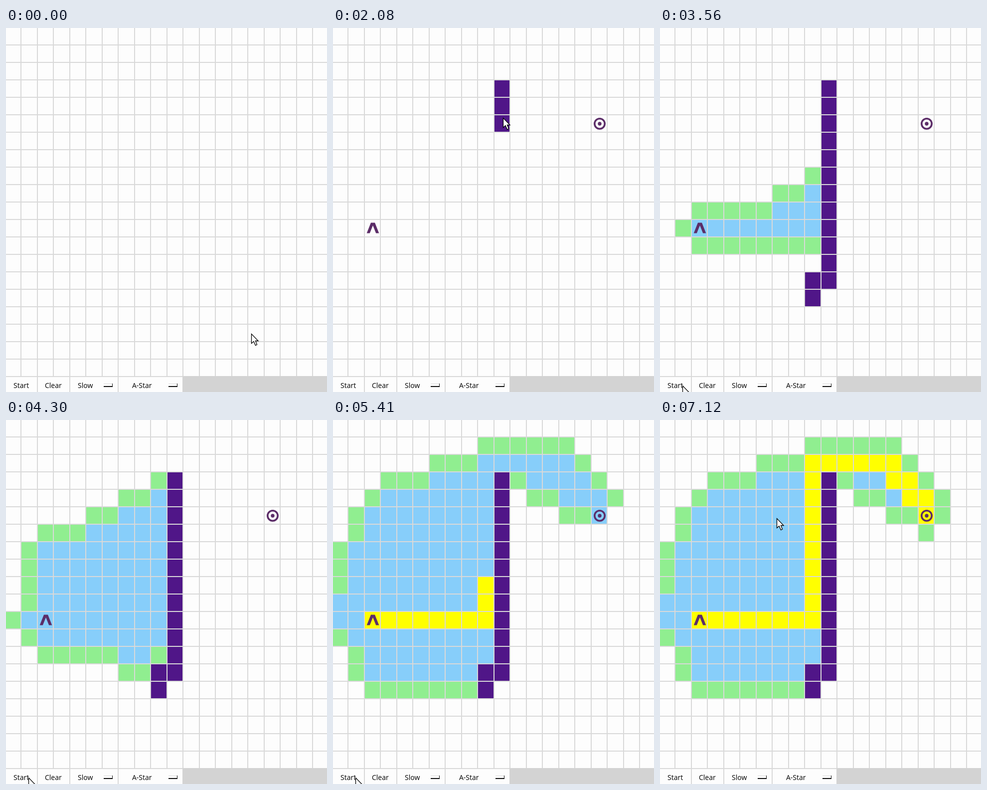
These frames come from a looping animation (644x730 px, 7.17 s). An HTML page with a canvas:

```html
<!DOCTYPE html>
<html lang="en">
<head>
<meta charset="utf-8">
<title>Path search on a grid</title>
<style>
  html, body { margin: 0; width: 644px; height: 730px; overflow: hidden; background: #fdfdfd; }
  #stage { position: relative; width: 644px; height: 730px; overflow: hidden; }
  canvas, svg { position: absolute; left: 0; top: 0; }
  span { position: absolute; top: 707px; font: 14px/20px "Open Sans", "Noto Sans", sans-serif; color: #000; white-space: nowrap; }
</style>
</head>
<body>
<div id="stage">
  <canvas id="grid" width="644" height="730"></canvas>
  <span style="left:15px">Start</span>
  <span style="left:78px">Clear</span>
  <span style="left:144px">Slow</span>
  <span style="left:253px">A-Star</span>
  <svg width="644" height="730">
    <path id="cursor" d="M.5.5V19.5L5 15.5L8.5 23.5L11.5 22L8.5 14.5H14Z" fill="#fff" stroke="#000" stroke-width="1.3"/>
  </svg>
</div>
<script>
const LOOP = 7170, TICK = 46.238, LAST_TICK = 154;
const COLS = 20, ROWS = 20;
const START = [2, 11], GOAL = [16, 5];
const COLOR = {
  cell: '#fdfdfd', line: '#d9d9d9', panel: '#d3d3d3', wall: '#501688',
  open: '#90ee90', closed: '#87cefa', path: '#ffff00', mark: '#5c2d68'
};

// time, x, y of the pointer tip
const POINTER = [
  [0, 492, 613], [140, 470, 600], [620, 82, 402], [860, 82, 402],
  [1290, 437, 292], [1430, 535, 194], [1560, 535, 194], [1820, 342, 116],
  [1880, 340, 118], [2220, 342, 224], [2440, 338, 506], [2480, 308, 510],
  [2540, 304, 545], [2770, 96, 685], [2960, 45, 717], [6600, 45, 717],
  [7080, 234, 197], [LOOP, 234, 197]
];
const START_AT = 690, GOAL_AT = 1480, DRAG = [1850, 2545];
const SEARCH_TICK = 73, PATH_TICK = 117, END_TICK = 129;

const lineX = c => Math.floor(30.5 + 32.5 * (c - 1));
const lineY = r => 34 + 35 * (r - 1);
const key = (c, r) => r * COLS + c;

function pointer(t) {
  const i = POINTER.findIndex(p => p[0] > t);
  const [t0, x0, y0] = POINTER[i - 1], [t1, x1, y1] = POINTER[i];
  const u = (t - t0) / (t1 - t0);
  return [x0 + (x1 - x0) * u, y0 + (y1 - y0) * u];
}

// Cells crossed while dragging become walls.
const walls = new Map();
for (let t = DRAG[0]; t <= DRAG[1]; t += 2) {
  const [x, y] = pointer(t);
  const k = key(Math.floor((x - 30.5) / 32.5) + 1, Math.floor((y - 34) / 35) + 1);
  if (!walls.has(k)) walls.set(k, t);
}

function search() {
  const score = (c, r, g) =>
    Math.round(1e6 * (g + Math.SQRT2 * Math.hypot(c - GOAL[0], r - GOAL[1])));
  const node = (c, r, g, from) => ({ c, r, g, from, f: score(c, r, g), seen: 0, done: Infinity });
  const first = node(...START, 0, null);
  const nodes = new Map([[key(...START), first]]);
  const queue = [first];
  let step = 0, last = null;
  while (queue.length && !last) {
    let best = 0;
    queue.forEach((n, i) => { if (n.f < queue[best].f) best = i; });
    const n = queue.splice(best, 1)[0];
    n.done = ++step;
    if (n.c === GOAL[0] && n.r === GOAL[1]) last = n;
    for (const [dc, dr] of [[0, -1], [1, 0], [0, 1], [-1, 0]]) {
      const c = n.c + dc, r = n.r + dr, k = key(c, r);
      if (c < 0 || r < 0 || c >= COLS || r >= ROWS || walls.has(k) || nodes.has(k)) continue;
      const next = node(c, r, n.g + 1, n);
      next.seen = last ? Infinity : step;
      nodes.set(k, next);
      queue.push(next);
    }
  }
  const path = [];
  for (let n = last; n; n = n.from) path.unshift(n);
  return { nodes: [...nodes.values()], path };
}

const { nodes, path } = search();
const ctx = document.getElementById('grid').getContext('2d');
const cursor = document.getElementById('cursor');

function box(color, x, y, w, h) {
  ctx.fillStyle = color;
  ctx.fillRect(x, y, w, h);
}

function fillCell(c, r, color) {
  const x = lineX(c) + 1, y = lineY(r) + 1;
  box(color, x, y, lineX(c + 1) - 1 - x, lineY(r + 1) - 1 - y);
}

function drawBase() {
  box(COLOR.cell, 0, 0, 644, 730);
  for (let c = 1; c <= COLS; c++) box(COLOR.line, lineX(c) - 1, 0, 2, 699);
  for (let r = 1; r <= ROWS; r++) box(COLOR.line, 0, lineY(r) - 1, 644, 2);
  box(COLOR.panel, 354, 698, 290, 32);
  for (const x of [63, 128, 225]) box(COLOR.line, x - 1, 698, 2, 32);
  for (const x of [196, 326]) {
    box(COLOR.line, x, 713, 17, 1);
    box('#111', x, 718, 18, 2);
    box('#111', x + 17, 713, 1, 7);
  }
}

function drawStart() {
  ctx.fillStyle = COLOR.mark;
  ctx.fill(new Path2D('M76 390.5H84L92.3 411.5H86.2L80 396L73.8 411.5H67.7Z'));
}

function drawGoal() {
  ctx.strokeStyle = ctx.fillStyle = COLOR.mark;
  ctx.lineWidth = 3.6;
  ctx.beginPath();
  ctx.arc(535, 192, 10.2, 0, 7);
  ctx.stroke();
  ctx.beginPath();
  ctx.arc(535, 192, 3.7, 0, 7);
  ctx.fill();
}

function draw(time) {
  const tick = Math.min(LAST_TICK, Math.floor((time + 4.99) / TICK));
  const t = Math.round(tick * TICK / 10) * 10;
  drawBase();
  for (const [k, at] of walls) {
    if (at <= t) fillCell(k % COLS, Math.floor(k / COLS), COLOR.wall);
  }
  const step = 3 * (tick - SEARCH_TICK);
  if (step > 0) {
    for (const n of nodes) {
      if (n.done <= step) fillCell(n.c, n.r, COLOR.closed);
      else if (n.seen <= step || tick >= END_TICK) fillCell(n.c, n.r, COLOR.open);
    }
  }
  const shown = Math.max(0, Math.floor(10 + 1.5 * (tick - PATH_TICK)));
  path.slice(0, shown).forEach(n => fillCell(n.c, n.r, COLOR.path));
  if (t >= START_AT) drawStart();
  if (t >= GOAL_AT) drawGoal();
  const [x, y] = pointer(t).map(Math.round);
  cursor.setAttribute('transform', `translate(${x} ${y})`);
}

const origin = performance.now();
function loop() {
  draw((performance.now() - origin) % LOOP);
  requestAnimationFrame(loop);
}
loop();
</script>
</body>
</html>
```
